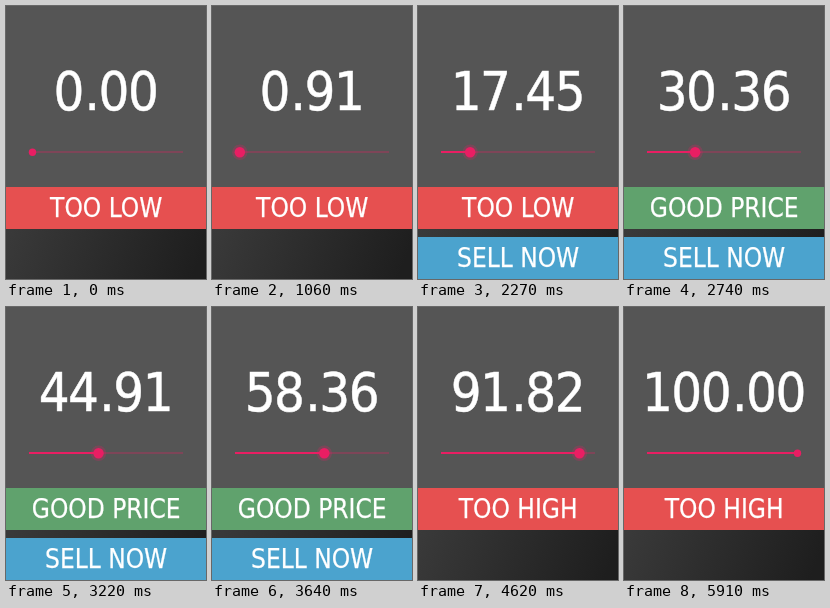
Recreate the animation shown at these times as an HTML page. Size 200 by 273 pixels, loop 6.93 s.

```html
<!DOCTYPE html>
<html lang="en">
<head>
<meta charset="utf-8">
<title>Price slider</title>
<style>
  html, body { margin: 0; width: 100%; height: 100%; overflow: hidden; background: #555; }
  svg { display: block; width: 100vw; height: 100vh; }
  text {
    font: 26px "DejaVu Sans Condensed", "Noto Sans", sans-serif;
    fill: #fff; stroke: #fff; stroke-width: .25; text-anchor: middle;
  }
  #number { font-size: 54px; letter-spacing: -.026em; stroke-width: .5; }
  .pink { fill: #e91e63; }
</style>
</head>
<body>
<svg viewBox="0 0 200 273">
  <defs>
    <linearGradient id="shade" gradientUnits="userSpaceOnUse" x1="0" y1="223" x2="180" y2="290">
      <stop offset="0" stop-color="#3a3a3a"/>
      <stop offset="1" stop-color="#1e1e1e"/>
    </linearGradient>
  </defs>
  <rect width="200" height="181" fill="#555"/>
  <rect y="223" width="200" height="50" fill="url(#shade)"/>

  <text id="number" x="99.4" y="103.6"><tspan id="whole">0</tspan><tspan dx="1.5">.</tspan><tspan id="cents">00</tspan></text>

  <rect class="pink" x="23" y="145" width="154" height="2" opacity=".28"/>
  <rect class="pink" id="fill" x="23" y="145" width="4" height="2"/>
  <circle class="pink" id="halo" cy="146.25" r="7.7" opacity="0"/>
  <circle class="pink" id="thumb" cy="146.25" r="3.7"/>

  <rect id="band" y="181" width="200" height="42"/>
  <text id="verdict" x="100.2" y="210.8"></text>

  <g id="sell">
    <rect y="231" width="200" height="42" fill="#4ba3ce"/>
    <text x="100.2" y="261">SELL NOW</text>
  </g>
</svg>
<script>
  const LOOP = 6930;
  const STEPS = 550;
  const $ = id => document.getElementById(id);
  const clamp = x => Math.min(1, Math.max(0, x));
  const ramp = (t, from, to) => clamp((t - from) / (to - from));

  // Start time and length of each run of evenly held pictures
  const cadence = [[0, 460], [460, 67.03], [2940, 70], [4340, 69], [5030, 66.25], [5560, 70]];

  // Time, value, speed per ms
  const drag = [
    [920, 0, .005], [1130, 1.09, 0], [1330, 1.09, .006], [1867, 8.55, .0185],
    [2739, 30.36, .029], [3640, 58.36, .033], [4200, 78.36, .035],
    [4616, 91.82, .029], [4960, 100, .016]
  ];

  function hold(t) {
    const [start, step] = cadence.findLast(c => c[0] <= t);
    return start + Math.floor((t - start + 10) / step) * step;
  }

  function valueAt(t) {
    if (t <= drag[0][0]) return 0;
    const next = drag.findIndex(p => p[0] > t);
    if (next < 0) return 100;
    const [t0, v0, s0] = drag[next - 1], [t1, v1, s1] = drag[next];
    const h = t1 - t0, u = (t - t0) / h, w = 1 - u;
    const v = v0 * w * w * (1 + 2 * u) + v1 * u * u * (1 + 2 * w) + h * u * w * (s0 * w - s1 * u);
    return Math.round(v / 100 * STEPS) / STEPS * 100;
  }

  function draw(time) {
    const t = time < 460 ? 0 : hold(time);
    const value = valueAt(t);
    const x = 26.5 + 1.47 * value;
    const good = value >= 20 && value < 80;

    const [whole, cents] = value.toFixed(2).split('.');
    $('whole').textContent = whole;
    $('cents').textContent = cents;

    $('fill').setAttribute('width', x - 23);
    $('thumb').setAttribute('cx', x);
    $('thumb').setAttribute('r', 3.7 + 1.55 * (ramp(t, 400, 728) - ramp(t, 5490, 5910)));
    $('halo').setAttribute('cx', x);
    $('halo').setAttribute('opacity', .24 * (ramp(t, 920, 1060) - ramp(t, 4900, 5030)));

    $('band').setAttribute('fill', good ? '#60a26d' : '#e65050');
    $('verdict').textContent = good ? 'GOOD PRICE' : value < 20 ? 'TOO LOW' : 'TOO HIGH';
    $('sell').style.display = value >= 10 && value < 90 ? '' : 'none';
  }

  const start = performance.now();
  function tick() {
    draw((performance.now() - start) % LOOP);
    requestAnimationFrame(tick);
  }
  tick();
</script>
</body>
</html>
```
